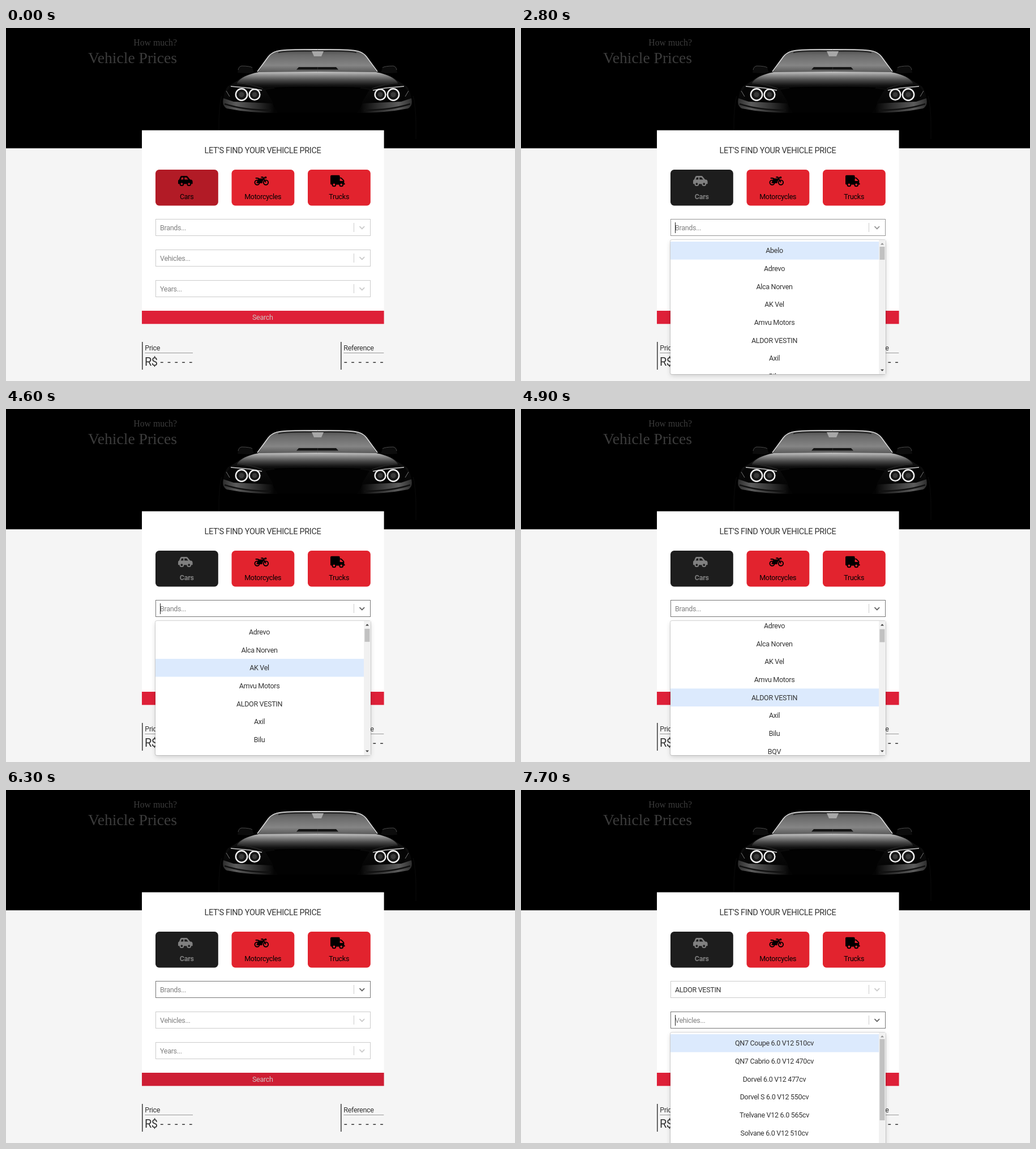
Recreate the animation shown at these times as an HTML page with a canvas. Size 899 by 623 pixels, loop 8 s.

```html
<!DOCTYPE html>
<html lang="en">
<head>
<meta charset="utf-8">
<title>Vehicle Prices</title>
<style>
  html, body { margin: 0; width: 100%; height: 100%; overflow: hidden; background: #f5f5f5; }
  canvas { display: block; }
</style>
</head>
<body>
<canvas id="stage" width="899" height="623"></canvas>
<script>
const ctx = document.getElementById('stage').getContext('2d');
const LOOP = 8000, TICK = 100, ROW = 31.67;
const SANS = 'Roboto, "Open Sans", sans-serif';
const SERIF = '"Liberation Serif", "Noto Serif", serif';

const BRANDS = ['Abelo', 'Adrevo', 'Alca Norven', 'AK Vel', 'Amvu Motors',
  'ALDOR VESTIN', 'Axil', 'Bilu', 'BQV'];
const MODELS = ['QN7 Coupe 6.0 V12 510cv', 'QN7 Cabrio 6.0 V12 470cv', 'Dorvel 6.0 V12 477cv',
  'Dorvel S 6.0 V12 550cv', 'Trelvane V12 6.0 565cv', 'Solvane 6.0 V12 510cv'];

const RED = [226, 35, 46], RED_HOVER = [178, 27, 38], INK = [29, 29, 29];
const SEARCH = [222, 32, 56], SEARCH_HOVER = [174, 26, 45];
const BLACK = [0, 0, 0], GRAY = [128, 128, 128];
const IDLE = [204, 204, 204], HOVER = [179, 179, 179], FOCUS = [118, 118, 118], ARROW = [102, 102, 102];

const rgb = c => `rgb(${c.map(Math.round)})`;
const mix = (a, b, k) => a.map((v, i) => v + (b[i] - v) * k);
const clamp = v => Math.max(0, Math.min(1, v));
// Progress reached after each tick of a transition with n steps.
const ramp = (t, start, n) => clamp(((t - start) / TICK + 1) / n);
const within = (t, a, b) => t >= a && t < b;

const wheel = (x, y, r) => `M${x - r} ${y}a${r} ${r} 0 1 0 ${2 * r} 0a${r} ${r} 0 1 0 ${-2 * r} 0z`;
const CAR = new Path2D('M544 192h-16L419 56Q400 32 369 32H155Q112 32 96 72L48 194Q0 206 0 256v112q0 16 16 16h48' +
  'a96 96 0 0 0 192 0h128a96 96 0 0 0 192 0h48q16 0 16-16v-80q0-96-96-96z' +
  'M232 192H117l38-96h77zM280 192V96h89l77 96z' + wheel(160, 384, 48) + wheel(480, 384, 48));
const TRUCK = new Path2D('M624 352h-16V244q0-20-14-34L494 110q-14-14-34-14h-44V48q0-48-48-48H48Q0 0 0 48v320' +
  'q0 48 48 48h16a96 96 0 0 0 192 0h128a96 96 0 0 0 192 0h48q16 0 16-16v-32q0-16-16-16z' +
  'M560 256H416V144h44l100 100z' + wheel(160, 416, 48) + wheel(480, 416, 48));
const BIKE_LINES = new Path2D(wheel(128, 320, 104) + wheel(512, 320, 104) + 'M296 88H376L512 315');
const BIKE_BODY = new Path2D('M72 104H128Q200 104 228 144H382L419 114L457 72Q464 64 475 64H520q24 0 24 24v32' +
  'q0 24-24 24H438L450 180Q362 240 360 328Q360 352 336 352H120Q85 345 99 316L176 177Q160 152 128 152H72q-48-24 0-48z');

function rect(x, y, w, h, fill) {
  ctx.fillStyle = fill;
  ctx.fillRect(x, y, w, h);
}

function text(str, x, y, { size = 12.5, color = '#333', align = 'left', weight = 400, family = SANS, words = 0 } = {}) {
  ctx.font = `${weight} ${size}px ${family}`;
  ctx.letterSpacing = family === SANS ? `${-0.024 * size}px` : '0px';
  ctx.wordSpacing = `${words}px`;
  ctx.textAlign = align;
  ctx.fillStyle = color;
  ctx.fillText(str, x, y);
}

function gradient(x0, y0, x1, y1, stops) {
  const g = ctx.createLinearGradient(x0, y0, x1, y1);
  stops.forEach(([at, c]) => g.addColorStop(at, c));
  return g;
}
const vertical = (y0, y1, ...stops) => gradient(0, y0, 0, y1, stops);
const horizontal = (x0, x1, ...stops) => gradient(x0, 0, x1, 0, stops);

function fillPath(d, fill) {
  ctx.fillStyle = fill;
  ctx.fill(new Path2D(d));
}

function strokePath(d, color, width) {
  ctx.strokeStyle = color;
  ctx.lineWidth = width;
  ctx.stroke(new Path2D(d));
}

// Half of the car front, measured from its centre line.
function halfCar() {
  fillPath('M-.5 38Q58 37 72 41Q82 44 87 51L105 78H-.5z',
    vertical(38, 78, [0, '#4c4c4c'], [.25, '#6a6a6a'], [.7, '#858585'], [1, '#5a5a5a']));
  fillPath('M-.5 69H33L37 73.5H-.5z', '#141414');
  strokePath('M0 38Q58 37 72 41Q82 44 87 51L106 77', '#d4d4d4', 1.8);
  strokePath('M0 41Q56 40 69 43.5', '#1a1a1a', 1.6);

  fillPath('M112 79L115 70Q119 67 134 67Q140 68 141 79L124 80z', '#0c0c0c');
  strokePath('M115 70Q119 67 134 67Q139 68 140 74', '#4a4a4a', 1);

  fillPath('M104 78Q128 82 141 93L158 103Q166 112 167 136Q158 146 80 150L72 110z',
    vertical(80, 150, [0, '#333'], [.25, '#0e0e0e'], [1, '#000']));
  fillPath('M-.5 77L104 78Q134 84 142 97Q120 98 96 107Q60 103 -.5 104z',
    vertical(77, 107, [0, '#c4c4c4'], [.2, '#909090'], [.5, '#4a4a4a'], [.8, '#141414'], [1, '#030303']));
  strokePath('M142 98Q120 98 96 107', '#2c2c2c', 1);
  fillPath('M-.5 105Q60 104 92 109L78 132L74 149H-.5z', '#020202');

  fillPath('M166 124Q169 137 160 142Q120 150 70 150L80 133L148 130z',
    horizontal(166, 76, [0, '#303030'], [.25, '#5c5c5c'], [.7, '#2a2a2a'], [1, '#040404']));
  strokePath('M164 134Q130 145 82 145', '#111', 2.5);

  fillPath('M98 109L153 102L161 114L150 129L104 130z', '#050505');
  strokePath('M98 110L120 106L153 103', '#ccc', 1.4);
  strokePath('M161 111L155 121', '#777', 1);
  for (const [x, r] of [[134, 10.2], [111, 9.4]]) {
    ctx.beginPath();
    ctx.arc(x, 117.5, r, 0, 7);
    ctx.fillStyle = '#181818';
    ctx.fill();
    ctx.strokeStyle = '#f4f4f4';
    ctx.lineWidth = 2.4;
    ctx.stroke();
    ctx.beginPath();
    ctx.arc(x, 117.5, r * .45, 0, 7);
    ctx.fillStyle = '#3a3a3a';
    ctx.fill();
  }
  strokePath('M169 120Q175 140 174 196', '#080808', 1.5);
}

function hero() {
  rect(0, 0, 899, 212.3, '#000');
  for (const side of [1, -1]) {
    ctx.save();
    ctx.translate(550, 0);
    ctx.scale(side, 1);
    halfCar();
    ctx.restore();
  }
  fillPath('M540 41H561L557 50H544z', '#a8a8a8');
  const style = { color: '#3c3c3c', align: 'right', family: SERIF };
  text('How much?', 302, 31, { ...style, size: 15.8 });
  text('Vehicle Prices', 302, 62, { ...style, size: 27.6 });
}

function bike() {
  ctx.lineWidth = 48;
  ctx.stroke(BIKE_LINES);
  ctx.fill(BIKE_BODY);
}

function kindButton(x, label, icon, fill, ink, weight = 400) {
  ctx.beginPath();
  ctx.roundRect(x, 250, 110.8, 63.4, 6.5);
  ctx.fillStyle = rgb(fill);
  ctx.fill();
  ctx.save();
  ctx.translate(x + 40, 259.8);
  ctx.scale(.04, .04);
  ctx.fillStyle = ctx.strokeStyle = rgb(ink);
  icon === 'bike' ? bike() : ctx.fill(icon, 'evenodd');
  ctx.restore();
  text(label, x + 55.2, 301.5, { align: 'center', color: rgb(ink), weight });
}

function select(y, label, { value, border = IDLE, arrow = IDLE, caret = false } = {}) {
  rect(264, y, 380, 30, rgb(border));
  rect(265, y + 1, 378, 28, '#fff');
  text(value || label, 272, y + 20, { color: value ? '#333' : '#808080' });
  rect(614, y + 7, 1, 16, '#ccc');
  ctx.lineCap = 'round';
  strokePath(`M625 ${y + 13.6}l3.8 3.8l3.8-3.8`, rgb(arrow), 1.9);
  ctx.lineCap = 'butt';
  if (caret) rect(272, y + 6, 1, 19, '#222');
}

function menu(y, h, items, { scroll = 0, active, thumbY, thumbH }) {
  ctx.save();
  ctx.shadowColor = 'rgba(0,0,0,.16)';
  ctx.shadowBlur = 9;
  ctx.shadowOffsetY = 3;
  ctx.beginPath();
  ctx.roundRect(264, y, 380, h, 3);
  ctx.fillStyle = '#fff';
  ctx.fill();
  ctx.restore();
  ctx.strokeStyle = 'rgba(0,0,0,.14)';
  ctx.lineWidth = 1;
  ctx.beginPath();
  ctx.roundRect(263.5, y - .5, 381, h + 1, 3);
  ctx.stroke();

  ctx.save();
  ctx.beginPath();
  ctx.rect(264, y, 380, h);
  ctx.clip();
  items.forEach((item, i) => {
    const top = y + 3 + i * ROW - scroll;
    if (i === active) rect(264, top, 368, ROW, '#dceafd');
    text(item, 447.5, top + 20.4, { align: 'center' });
  });
  rect(632, y, 12, h, '#f1f1f1');
  rect(633.5, thumbY, 9, thumbH, '#c1c1c1');
  fillPath(`M635 ${y + 8.5}h6l-3-3.2z`, scroll ? '#404040' : '#909090');
  fillPath(`M635 ${y + h - 8.5}h6l-3 3.2z`, '#404040');
  ctx.restore();
}

function result(x, w, label) {
  rect(x, 554, 1.6, 49, '#444');
  text(label, x + 5.3, 568.5);
  rect(x + 5.3, 573, w, 1, '#999');
}

function pointerY(t) {
  const moves = [[5600, 509], [5100, 540], [4900, 509], [4100, 468], [4000, 424]];
  const last = moves.find(([at]) => t >= at);
  return last ? last[1] : 393;
}

function brandSelect(t) {
  const opened = ramp(t, 2800, 2), blurred = ramp(t, 7600, 2);
  const hovered = mix(IDLE, HOVER, ramp(t, 2100, 2));
  select(337, 'Brands...', {
    value: t >= 6700 ? BRANDS[5] : '',
    border: mix(mix(hovered, FOCUS, opened), IDLE, blurred),
    arrow: mix(mix(IDLE, ARROW, opened), IDLE, blurred),
    caret: within(t, 2800, 3500) || within(t, 4100, 4700) || within(t, 5200, 5900)
  });
}

function brandMenu(t) {
  const k = ramp(t, 4500, 3);
  const ease = k * k * (3 - 2 * k);
  const scroll = 42 * ease;
  menu(374, 237, BRANDS, {
    scroll,
    active: Math.floor((pointerY(t) - 377 + scroll) / ROW),
    thumbY: 386 + 2.5 * ease,
    thumbH: 23
  });
}

function draw(t) {
  rect(0, 0, 899, 623, '#f5f5f5');
  hero();
  rect(240, 180.5, 427.6, 342, '#fff');
  text("LET'S FIND YOUR VEHICLE PRICE", 453.5, 221, { size: 14.5, align: 'center' });

  const picked = ramp(t, 1200, 3);
  kindButton(264, 'Cars', CAR, mix(RED_HOVER, INK, picked), mix(BLACK, GRAY, picked), t >= 2100 ? 700 : 400);
  kindButton(398.5, 'Motorcycles', 'bike', RED, BLACK);
  kindButton(533, 'Trucks', TRUCK, RED, BLACK);

  const opened = ramp(t, 7600, 2);
  brandSelect(t);
  select(391, 'Vehicles...', {
    border: mix(t >= 7400 ? HOVER : IDLE, FOCUS, opened),
    arrow: mix(IDLE, ARROW, opened),
    caret: t >= 7600
  });
  select(445, 'Years...', { border: within(t, 7100, 7200) ? HOVER : IDLE });

  const hot = ramp(t, 6300, 3) - ramp(t, 7000, 3);
  rect(240, 499, 427.6, 23.3, rgb(mix(SEARCH, SEARCH_HOVER, hot)));
  text('Search', 453.3, 515.3, { align: 'center', color: '#d0c0c0' });

  result(240, 84.7, 'Price');
  text('R$', 245, 596, { size: 20 });
  text('- - - - -', 272.5, 596, { size: 20, words: 3.2 });
  result(591, 71, 'Reference');
  text('- - - - - -', 597, 596, { size: 20, words: 3.2 });

  if (within(t, 2800, 6300)) brandMenu(t);
  if (t >= 7600) menu(428, 237, MODELS, { active: 0, thumbY: 439.5, thumbH: 143.5 });
}

const start = performance.now();
function frame() {
  const t = (performance.now() - start) % LOOP;
  draw(Math.floor(t / TICK) * TICK);
  requestAnimationFrame(frame);
}
frame();
</script>
</body>
</html>
```
